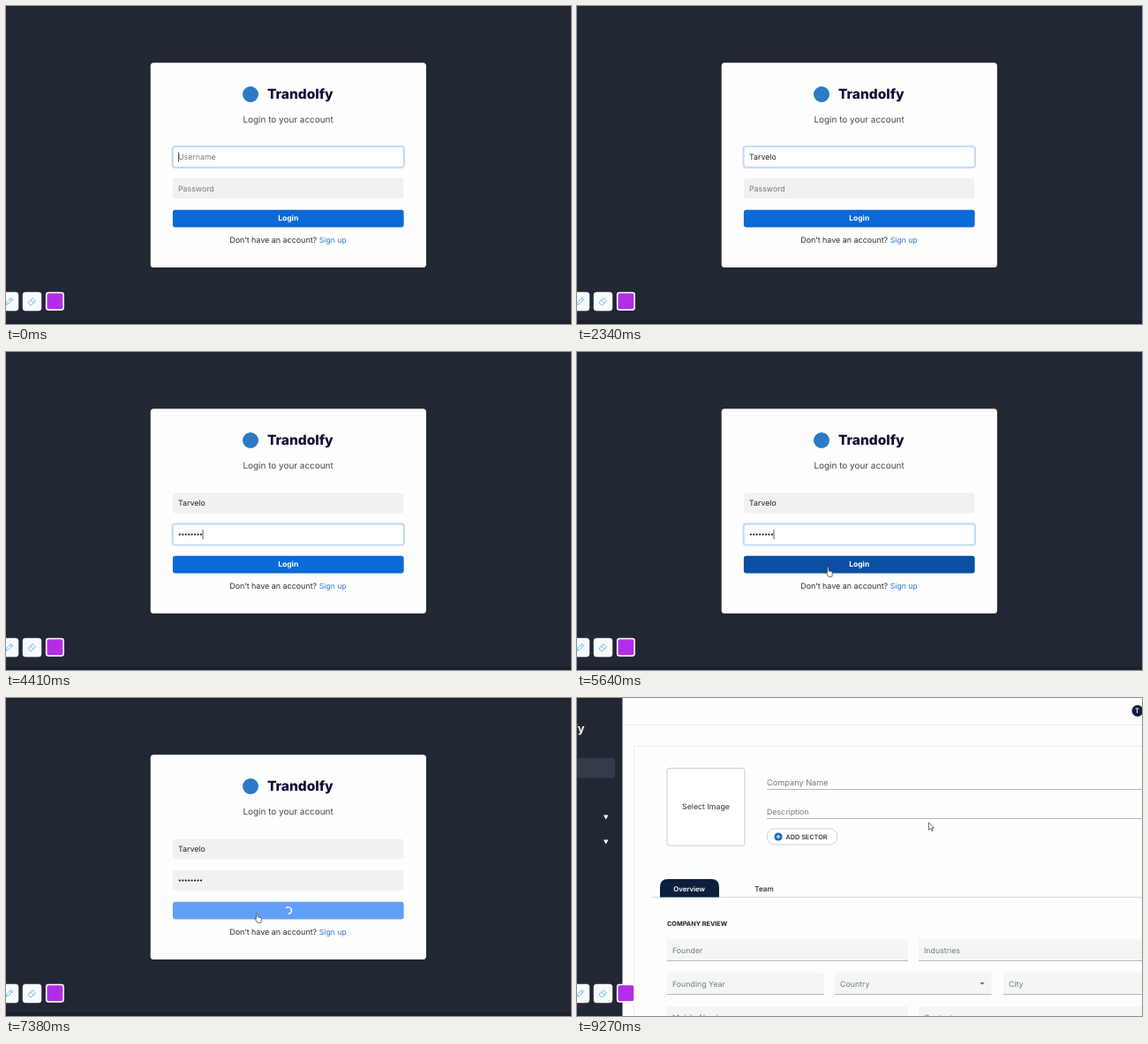
Recreate the animation shown at these times as an HTML page. Size 640 by 360 pixels, loop 9300 ms.

```html
<!DOCTYPE html>
<html>
<head>
<meta charset="utf-8">
<style>
html, body { margin: 0; width: 100%; height: 100%; overflow: hidden; background: #fff }
svg { display: block; width: 640px; height: 360px; font: 8.8px Inter, "Open Sans", sans-serif; text-rendering: geometricPrecision }
.mid { text-anchor: middle }
.bold { font-weight: 700 }
.semi { font-weight: 600 }
.hint { fill: #757a80 }
.line { stroke: #b4b9be; fill: none }
.focus { fill: #fff; stroke: #c4dcfa; stroke-width: 2.2 }
.idle { fill: #f2f1f1 }
.icon { fill: none; stroke: #63b3e2; stroke-width: .9; stroke-linejoin: round }
</style>
</head>
<body>
<svg viewBox="0 0 640 360">
  <g id="login">
    <path fill="#222734" d="M0 0h640v360H0z"/>
    <path fill="#1d212d" d="M0 356h640v4H0z"/>
    <rect x="163.7" y="64.2" width="312.2" height="231.8" rx="3.5" fill="#fefefe"/>
    <circle cx="277" cy="100" r="9" fill="#2b7bc4"/>
    <text x="296" y="105.4" font-weight="800" font-size="15.5" fill="#0e0c35">Trandolfy</text>
    <text x="319.6" y="131.8" class="mid" font-size="9.95" fill="#46464c">Login to your account</text>
    <rect id="userBox" rx="3"/>
    <rect id="passBox" rx="3"/>
    <text id="user" x="195" y="173.8"></text>
    <text id="pass" x="195" y="209.5" class="hint">Password</text>
    <g id="dots" fill="#222"></g>
    <rect id="caret" width=".8" height="11" fill="#333"/>
    <rect id="button" x="188.9" y="230.8" width="261.7" height="19.6" rx="3"/>
    <text id="label" x="319.7" y="243.3" class="mid bold" font-size="8.5" fill="#fff">Login</text>
    <path id="spin" d="M0-3.7A3.7 3.7 0 1 1 -2.83 2.38" fill="none" stroke="#fff" stroke-width="1.5"/>
    <text x="253.3" y="267.8" font-size="8.93" fill="#2b2b30">Don’t have an account?</text>
    <text x="354.8" y="267.8" font-size="8.65" fill="#3273cb">Sign up</text>
  </g>

  <g id="loading">
    <path fill="#fff" d="M0 0h640v360H0z"/>
    <circle id="ring" r="20.2" fill="none" stroke="#2a7cc0" stroke-width="3.6"/>
  </g>

  <g id="dash">
    <path fill="#fdfdfd" d="M0 0h640v360H0z"/>
    <path fill="#222734" d="M0 0h51.5v360H0z"/>
    <text x="8.5" y="39" class="bold" font-size="13" fill="#fff" text-anchor="end">Trandolfy</text>
    <rect x="-5" y="68" width="48" height="22.5" rx="3" fill="#363b49"/>
    <path fill="#fff" d="M30 132.5h5.5l-2.75 5zM30 160.5h5.5l-2.75 5z"/>
    <path stroke="#e9edf0" fill="none" d="M52 30.5H640M640 54.5H64.5V360"/>
    <circle cx="635" cy="14.5" r="6.5" fill="#0c1f3c"/>
    <text x="634.5" y="17.2" class="mid semi" font-size="7.5" fill="#fff">T</text>
    <rect x="102" y="79.5" width="88" height="87.5" rx="3" fill="#fff" stroke="#c6cdd3"/>
    <text x="146" y="126" class="mid" fill="#333">Select Image</text>
    <path class="line" d="M215 103.5H640M215 136.5H640"/>
    <g class="hint"><text x="215" y="98.5" font-size="9.2">Company Name</text><text x="215" y="131.5">Description</text></g>
    <rect x="215" y="148" width="80" height="18" rx="9" fill="#fff" stroke="#cbd0d4"/>
    <circle cx="228" cy="157" r="4.6" fill="#1766c0"/>
    <path stroke="#fff" d="M225.7 157h4.6M228 154.7v4.6"/>
    <text x="236.5" y="159.6" font-size="7.3" font-weight="500" fill="#222">ADD SECTOR</text>
    <path stroke="#d5dade" d="M85 225.5H640"/>
    <path fill="#0c1f3c" d="M94 225.5V214q0-9 9-9h49q9 0 9 9v11.5z"/>
    <text x="127.2" y="218.7" class="mid semi" font-size="7.8" fill="#fff">Overview</text>
    <text x="212" y="218.7" class="mid" font-size="8.2" font-weight="500" fill="#222">Team</text>
    <text x="102" y="257.6" class="bold" font-size="7.25" fill="#222">COMPANY REVIEW</text>
    <g id="fields"></g>
    <path fill="#666" d="M456.5 322h5l-2.5 2.7z"/>
  </g>

  <g id="tools">
    <rect x="-8" y="324" width="22" height="21" rx="3" fill="#f7fbfd" stroke="#e6eff5" stroke-width=".5"/>
    <rect x="19" y="324" width="21" height="21" rx="3" fill="#f7fbfd" stroke="#e6eff5" stroke-width=".5"/>
    <path class="icon" d="M0 338l.8-2.7 5-5 1.9 1.9-5 5zM4.6 331.5l1.9 1.9"/>
    <path class="icon" d="M25.5 335l4.5-4.5 3.5 3.5-4.5 4.5h-1.5l-2-2zM27.7 332.8l3.5 3.5"/>
    <rect x="45.7" y="324.5" width="19.4" height="19.4" rx="2.5" fill="#b32de8" stroke="#fff" stroke-width="1.6"/>
  </g>

  <g fill="#fff" stroke="#333" stroke-width=".7" stroke-linejoin="round">
    <path id="arrow" d="M0 0v8.5l2-1.8 1.4 3 1.3-.6-1.4-2.9h2.700z"/>
    <path id="hand" d="M0 .6q0-1 .8-1t.8 1v3.2l3.2.8q1.1.3 1 1.5l-.4 4.2H1.2l-2.6-3.9q-.3-1 .6-1L0 6.2z"/>
  </g>
</svg>
<script>
const $ = id => document.getElementById(id);
const LOOP = 9300, TAB = 2500, CLICK = 5850, LOAD = 7707, DASH = 8800;
const NAME = 'Tarvelo', USER_AT = 640, USER_STEP = 150, PASS_AT = 3190, PASS_STEP = 160;
const clamp = (v, a, b) => Math.min(b, Math.max(a, v));
const ease = p => p * p * (3 - 2 * p);
const show = (id, on) => $(id).style.display = on ? '' : 'none';
const put = (id, x, y, extra = '') => $(id).setAttribute('transform', `translate(${x} ${y})${extra}`);
const typed = (t, start, step, max) => clamp(Math.floor((t - start) / step) + 1, 0, max);

$('fields').innerHTML = [
  [102, 273, 273, 'Founder'], [387, 273, 260, 'Industries'],
  [102, 311, 178, 'Founding Year'], [292, 311, 177.5, 'Country'], [483, 311, 160, 'City'],
  [102, 349, 273, 'Mobile Number'], [387, 349, 260, 'Contact']
].map(([x, y, w, s]) =>
  `<rect x="${x}" y="${y}" width="${w}" height="25" fill="#f4f6f6"/>
   <path class="line" d="M${x} ${y + 24.5}h${w}"/>
   <text class="hint" x="${x + 6}" y="${y + 16.2}">${s}</text>`).join('');

$('dots').innerHTML = Array.from({ length: 8 }, (_, i) =>
  `<circle cx="${196.8 + i * 3.45}" cy="206.6" r="1.15"/>`).join('');

function box(id, y, focused) {
  const b = $(id), grow = focused ? .4 : 0;
  b.setAttribute('class', focused ? 'focus' : 'idle');
  b.setAttribute('x', 189 - grow);
  b.setAttribute('y', y - grow);
  b.setAttribute('width', 261.5 + 2 * grow);
  b.setAttribute('height', 23 + 2 * grow);
}

function drawLogin(t) {
  const busy = t >= CLICK, inUser = t < TAB, inPass = !inUser && !busy;
  const n = typed(t, USER_AT, USER_STEP, NAME.length), m = typed(t, PASS_AT, PASS_STEP, 8);
  box('userBox', 159.4, inUser);
  box('passBox', 195.1, inPass);
  $('user').textContent = n ? NAME.slice(0, n) : 'Username';
  $('user').setAttribute('fill', n ? '#222' : '#757a80');
  show('pass', !m);
  [...$('dots').children].forEach((d, i) => d.style.display = i < m ? '' : 'none');

  const last = inUser ? (n ? USER_AT + (n - 1) * USER_STEP : 0) : m ? PASS_AT + (m - 1) * PASS_STEP : TAB;
  show('caret', !busy && (t - last) % 1060 < 530);
  const end = inUser ? (n ? $('user').getComputedTextLength() : 0) : m * 3.45;
  put('caret', 195 + end, inUser ? 165.3 : 201);

  const move = ease(clamp((t - 4850) / 650, 0, 1));
  const x = 600 - 316 * move, y = 366 - 122 * move;
  const over = x > 189 && x < 450 && y < 250;
  show('arrow', t > 4850 && !over);
  show('hand', over);
  put('arrow', x, y);
  put('hand', x - .5, y);
  $('button').setAttribute('fill', busy ? '#629ff9' : over ? '#0b4fa3' : '#0c69d8');
  show('label', !busy);
  show('spin', busy);
  put('spin', 319.8, 240.5, ` rotate(${(t - 6510) * .36})`);
}

function drawRing(t) {
  const p = (t - LOAD) / 1400 % 1, grow = ease(clamp(p * 2, 0, 1)), shrink = ease(clamp(p * 2 - 1, 0, 1));
  $('ring').setAttribute('stroke-dasharray', `${1 + 99 * grow} 200`);
  $('ring').setAttribute('stroke-dashoffset', -15 * grow - 110 * shrink);
  put('ring', 319.7, 180, ` scale(.475) rotate(${p * 360})`);
}

function frame(now) {
  const t = now % LOOP;
  show('login', t < LOAD);
  show('loading', t >= LOAD && t < DASH);
  show('dash', t >= DASH);
  if (t < LOAD) drawLogin(t);
  else {
    drawRing(t);
    show('hand', false);
    show('arrow', t >= DASH);
    put('arrow', 398.5, 141);
  }
}

const start = performance.now();
function tick() {
  frame(performance.now() - start);
  requestAnimationFrame(tick);
}
tick();
</script>
</body>
</html>
```
